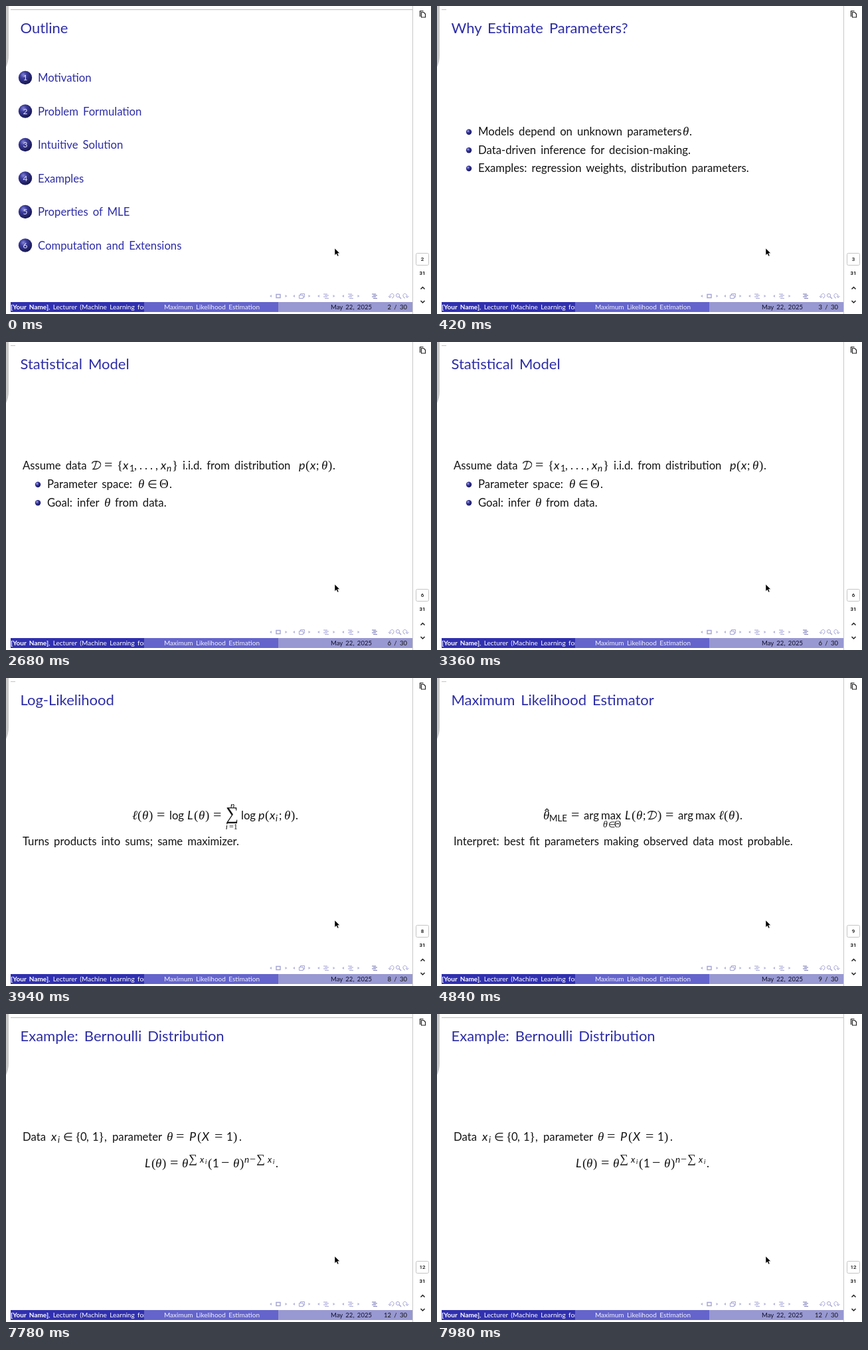
An HTML page that plays this animation: 640x464 px, repeating every 8000 ms.

```html
<!DOCTYPE html>
<html lang="en">
<head>
<meta charset="utf-8">
<title>Lecture slides</title>
<style>
html, body { margin: 0; width: 100%; height: 100%; overflow: hidden; background: #fff; }
svg { display: block; width: 640px; height: 464px; }
text { white-space: pre; }
.r, .i { font: 16.7px Lato, sans-serif; word-spacing: 2.8px; }
.i { font-style: italic; font-size: 18px; }
.s, .u { font: 19px "Liberation Serif", serif; }
.s { font-style: italic; }
.title { font: 22px Lato, sans-serif; word-spacing: 3.4px; }
.blue { fill: #2d2da8; }
.foot { font: 10px Lato, sans-serif; word-spacing: 1.9px; }
.date { font-size: 9.5px; }
.side { font: 500 8px Roboto, sans-serif; text-anchor: middle; }
.num { font: 12px Lato, sans-serif; fill: #e4e4f6; text-anchor: middle; }
.line { fill: none; stroke: currentColor; }
</style>
</head>
<body>
<svg id="stage" viewBox="0 0 640 464">
  <defs>
    <radialGradient id="ball" cx=".36" cy=".3" r=".72">
      <stop offset="0" stop-color="#8484d2"/>
      <stop offset=".35" stop-color="#3a3a9c"/>
      <stop offset="1" stop-color="#16164e"/>
    </radialGradient>
    <radialGradient id="dot" cx=".36" cy=".34" r=".66">
      <stop offset="0" stop-color="#c4c4f4"/>
      <stop offset=".35" stop-color="#3e3ea8"/>
      <stop offset="1" stop-color="#141458"/>
    </radialGradient>
    <clipPath id="author"><path d="M7 446H208V462H7Z"/></clipPath>
    <path id="scriptD" class="line" stroke-width="1.2" d="M.5-8.8C1-11.8 4-12.3 7-12.3C13-12.3 14.8-8.4 13-5C11-1 6 0 1-.5M7-12C6-8 5-3 2.5-.5"/>
    <path id="hat" class="line" stroke-width="1.2" d="M-3 3L0 0L3 3"/>
    <g id="bars"><path class="line" d="M-4-3H2M-2-1H4M-4 1H2M-2 3.4H4"/></g>
  </defs>

  <path d="M0 0H4V74Q4 84 0 92Z" fill="#c9c9c9"/>
  <path d="M7 5.5H14" stroke="#c4c4c4"/>
  <path id="edge" d="M7 5.5H612" stroke="#bdbdbd"/>
  <path d="M612.5 0V464" stroke="#c8c8c8"/>

  <path d="M7 446H208V461H7Z" fill="#3030b0"/>
  <path d="M208 446H410V461H208Z" fill="#6464cc"/>
  <path d="M410 446H612V461H410Z" fill="#9898d2"/>
  <g class="foot">
    <text x="7" y="457" fill="#fff" clip-path="url(#author)"><tspan font-weight="700">[Your Name]</tspan>, Lecturer (Machine Learning for Everyone)</text>
    <text x="310" y="457" fill="#f2f2ff" text-anchor="middle">Maximum Likelihood Estimation</text>
    <text x="520" y="457" fill="#10102c" text-anchor="middle" class="date">May 22, 2025</text>
  </g>

  <g id="nav" color="#a4a4d6">
    <path class="line" stroke-width="1.4" d="M407 434.5H413V439.5H407Z"/>
    <path class="line" d="M441.5 435.5H447.5V440.5H441.5ZM443.5 435V433.5H449.5V438.5H448"/>
    <use href="#bars" x="482" y="437"/>
    <use href="#bars" x="519" y="437"/>
    <use href="#bars" x="555" y="437" color="#7474b4"/>
    <path class="line" d="M576 437L578 439.5L580.5 437M578 439C577 432 585 432 584 437Q583.5 440 581 440"/>
    <circle class="line" cx="590" cy="436" r="2.6"/>
    <path class="line" stroke-width="1.4" d="M592 438L595 441"/>
    <path class="line" d="M606.500 437L604 439.500L602 437M604 439C605 432 597 432 598 437Q598.500 440 601 440"/>
  </g>

  <g color="#222">
    <path class="line" stroke-width="1.2" d="M625.500 9.500H629L631.500 12V17H625.500ZM623.500 16V7.500H628.500"/>
    <rect x="617.500" y="372.500" width="19" height="18" rx="2" class="line" color="#c4c4c4"/>
    <text x="627" y="405" class="side">31</text>
    <path class="line" stroke-width="1.500" d="M624.500 426.500L627.500 423.500L630.500 426.500M624.500 444L627.500 447L630.500 444"/>
  </g>
  <g id="slides"></g>
  <path d="M495 365V375.500L497.500 373.300L499.300 377L501 376.200L499.400 372.600H502.600Z" stroke="#fff" stroke-width=".5"/>
</svg>
<script>
const LOOP = 8000;
const $ = id => document.getElementById(id);

function add(parent, tag, attrs, text) {
  const el = document.createElementNS('http://www.w3.org/2000/svg', tag);
  for (const k in attrs) el.setAttribute(k, attrs[k]);
  if (text) el.textContent = text;
  return parent.appendChild(el);
}

// Runs look like "r62 words" or "s80@13 θ": style, x, optional size, text.
// Styles: r sans, i sans italic, s serif italic, u serif, D script D, h hat, b bullet.
function line(g, y, runs) {
  for (const run of runs.split('  ')) {
    const [, style, x, size, text] = run.match(/^(\w)([\d.]+)(?:@([\d.]+))? ?(.*)$/);
    if (style === 'b') add(g, 'circle', { cx: x, cy: y - 5.2, r: 4.2, fill: 'url(#dot)' });
    else if (style === 'D') add(g, 'use', { href: '#scriptD', x, y });
    else if (style === 'h') add(g, 'use', { href: '#hat', x, y });
    else {
      const t = add(g, 'text', { x, y, class: style }, text);
      if (size) t.style.fontSize = size + 'px';
    }
  }
}

const topics = ['Motivation', 'Problem Formulation', 'Intuitive Solution', 'Examples',
  'Properties of MLE', 'Computation and Extensions'];

function outline(g) {
  topics.forEach((name, k) => {
    const y = 108 + 50.5 * k;
    add(g, 'circle', { cx: 29, cy: y, r: 10.2, fill: 'url(#ball)' });
    add(g, 'text', { x: 29, y: y + 4.3, class: 'num' }, String(k + 1));
    add(g, 'text', { x: 48, y: y + 6, class: 'r blue' }, name);
  });
}

// Start time, title, then [baseline, runs] rows; pages count up from 2.
const slides = [
  [0, 'Outline'],
  [400, 'Why Estimate Parameters?',
    [195, 'b48  r62 Models depend on unknown parameters  s370 θ  r380 .'],
    [222.5, 'b48  r62 Data-driven inference for decision-making.'],
    [250, 'b48  r62 Examples: regression weights, distribution parameters.']],
  [1160, 'Desirable Estimator Properties',
    [178, 'h168.5'],
    [195, 'b48  r62 Consistency:  s163 θ  u185 →  s208 θ  r231 as  i254 n  u268 →  u291@24 ∞  r310 .'],
    [198, 'i172@13.5 n  r217@13 0'],
    [222.5, 'b48  r62 Efficiency: achieving the Cramér–Rao lower bound.'],
    [250, 'b48  r62 Invariance: transform estimates under reparameterization.']],
  [2000, 'Role of Likelihood',
    [195, 'b48  r62 Measures how well  s206 θ  r221 explains the data.'],
    [222.5, 'b48  r62 Gives a general recipe for estimators.'],
    [250, 'b48  r62 Basis for testing and model selection.']],
  [2680, 'Statistical Model',
    [192, 'r25 Assume data  D129  u148@22 =  u167 {  i176 x  r193 ,  r201 .  r209 .  r217 .  r225 ,  i233 x  u250 }  r266 i.i.d. from distribution  i441 p  u451 (  i458 x  r467 ;  s475 θ  u485 )  r492 .'],
    [195, 'r186@13 1  i242@13.5 n'],
    [220, 'b48  r62 Parameter space:  s199 θ  u213@17 ∈  u231 Θ  r246 .'],
    [247.5, 'b48  r62 Goal: infer  s148 θ  r164 from data.']],
  [3380, 'Likelihood Function',
    [213, 'i211 L  u221 (  s228 θ  r238 ;  D245  u260 )  u272@22 =  u291@27 ∏  i315 p  u325 (  i332 x  r346 ;  s354 θ  u364 )  r371 .'],
    [216, 'i341@13 i'],
    [196, 'i298@12 n'],
    [228, 'i292@12 i  u297@12 =1'],
    [252, 'r25 Viewed as a function of  s211 θ  r226 for fixed data.']],
  [3940, 'Log-Likelihood',
    [213, 's190 ℓ  u198 (  s205 θ  u215 )  u227@22 =  r246 log  i273 L  u283 (  s290 θ  u300 )  u312@22 =  u331@27 ∑  r354 log  i380 p  u390 (  i397 x  r411 ;  s419 θ  u429 )  r436 .'],
    [216, 'i406@13 i'],
    [196, 'i338@12 n'],
    [228, 'i331@12 i  u336@12 =1'],
    [252, 'r25 Turns products into sums; same maximizer.']],
  [4840, 'Maximum Likelihood Estimator',
    [197, 'h165.5'],
    [213, 's160 θ  u202@22 =  r221 arg  r247 max  i283 L  u293 (  s300 θ  r310 ;  D317  u332 )  u344@22 =  r363 arg  r389 max  s424 ℓ  u432 (  s439 θ  u449 )  r456 .'],
    [215.5, 'r169@13.4 MLE'],
    [224.5, 's250@14 θ  u258@12 ∈  u267@14 Θ'],
    [252, 'r25 Interpret: best fit parameters making observed data most probable.']],
  [5640, 'Intuition',
    [195, 'b48  r62 Choose  s120 θ  r135 under which the data are most likely.'],
    [222.5, 'b48  r62 Peak of the likelihood curve.'],
    [250, 'b48  r62 Sharper peak means more information.']],
  [6300, 'Likelihood vs Probability',
    [206, 'b48  r62 Probability:  i157 p  u167 (  i173 x  u183@17 |  s187 θ  u197 )  r204 ,  i216 x  r233 random.'],
    [233.5, 'b48  r62 Likelihood:  i153 L  u163 (  s169 θ  u179@17 |  i183 x  u193 )  r200 ,  s211 θ  r226 variable.']],
  [7040, 'Example: Bernoulli Distribution',
    [190.500, 'r25 Data  i68 x  u86@17 ∈  u104 {  r112 0  r121 ,  r130 1  u139 }  r148 ,  r160 parameter  s242 θ  u256@22 =  i276 P  u288 (  i295 X  u314@22 =  r332 1  u342 )  r351 .'],
    [193.5, 'i78@13 i'],
    [231, 'i209 L  u219 (  s225 θ  u235 )  u247@22 =  s265 θ  u304 (  r311 1  u324@22 −  s342 θ  u352 )  r406 .'],
    [224, 'u275@18 ∑  i292@13.5 x  i359@13.5 n  u367@16 −  u377@18 ∑  i394@13.5 x'],
    [226, 'i300@10 i  i402@10 i']]
];

// Visible only inside [from, to); hard cuts at both ends.
function showDuring(el, from, to) {
  const key = (time, opacity) => ({ offset: time / LOOP, opacity, easing: 'step-end' });
  const keys = [key(0, from ? 0 : 1)];
  if (from) keys.push(key(from, 1));
  if (to < LOOP) keys.push(key(to, 0));
  keys.push(key(LOOP, to < LOOP ? 0 : 1));
  el.animate(keys, { duration: LOOP, iterations: Infinity });
}

slides.forEach(([start, title, ...rows], k) => {
  const g = add($('slides'), 'g', { fill: '#141414', color: '#141414' });
  const page = k + 2;
  add(g, 'text', { x: 21.5, y: 41, class: 'title blue' }, title);
  if (k === 0) outline(g);
  rows.forEach(([y, runs]) => line(g, y, runs));
  add(g, 'text', { x: 604, y: 457, class: 'foot date', 'text-anchor': 'end' }, page + ' / 30');
  add(g, 'text', { x: 627, y: 383.5, class: 'side' }, String(page));
  showDuring(g, start, slides[k + 1] ? slides[k + 1][0] : LOOP);
});

// The page edge shows at both ends of the loop.
$('edge').animate([
  { offset: 0, opacity: 1, easing: 'step-end' },
  { offset: 400 / LOOP, opacity: 0, easing: 'step-end' },
  { offset: 7780 / LOOP, opacity: 1 },
  { offset: 1, opacity: 1 }
], { duration: LOOP, iterations: Infinity });

// Small arrows on both sides of the first four navigation symbols.
[410, 445, 482, 519].forEach(x => {
  add($('nav'), 'path', { d: `M${x - 10} 435v4l-3-2zM${x + 10.5} 435v4l3-2z`, fill: '#b4b4de' });
});
</script>
</body>
</html>
```
